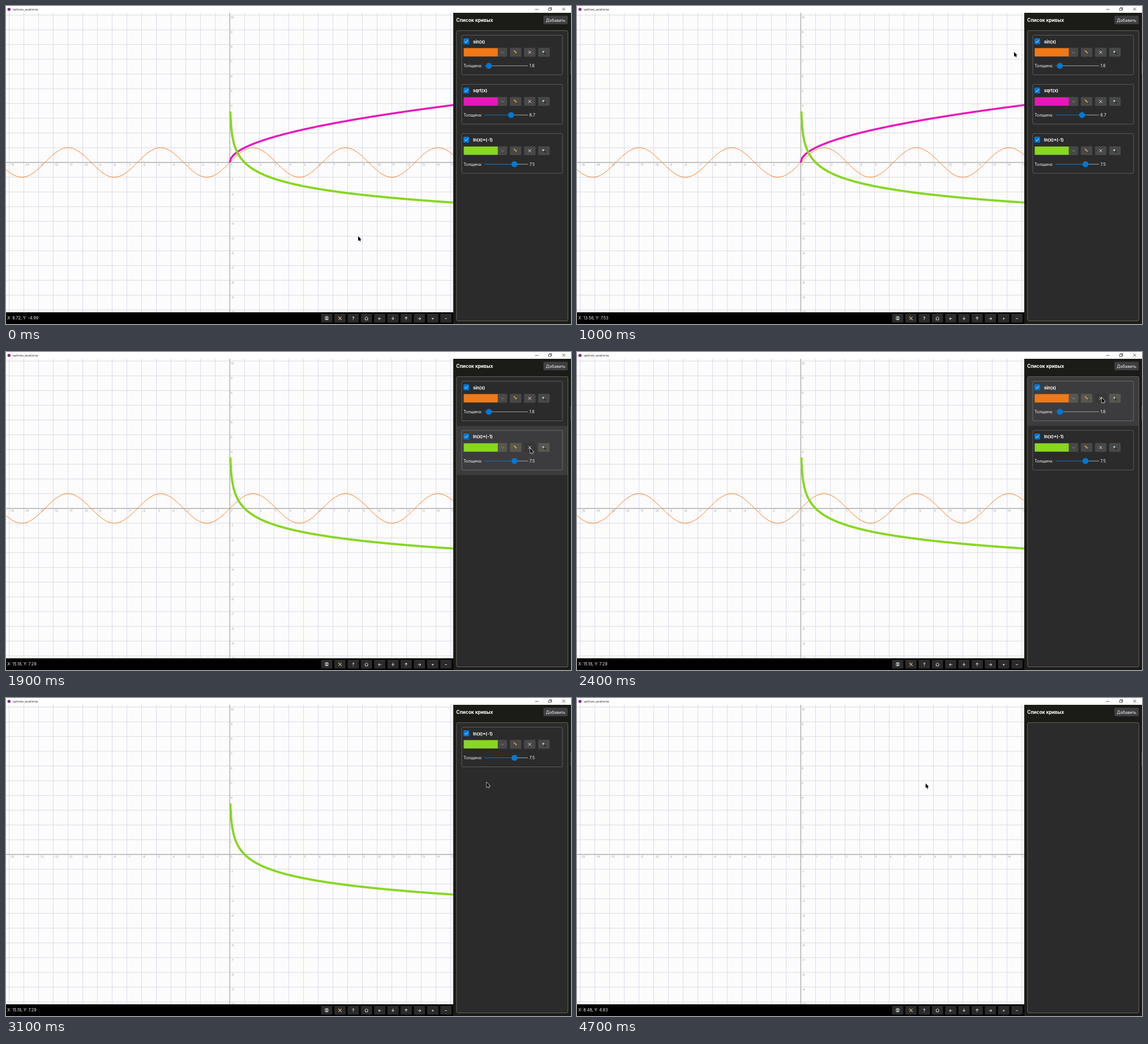
An HTML page with a canvas that plays this animation: 998x561 px, repeating every 4800 ms.

```html
<!DOCTYPE html>
<html lang="ru">
<head>
<meta charset="utf-8">
<title>splines_avalonia</title>
<style>
html, body { margin: 0; width: 100%; height: 100%; overflow: hidden; background: #000; }
canvas { display: block; width: 998px; height: 561px; }
</style>
</head>
<body>
<canvas id="stage" width="998" height="561"></canvas>
<script>
const g = document.getElementById('stage').getContext('2d');
const LOOP = 4800, STEP = 100;
const OX = 395.5, OY = 276, UNIT = 26, PLOT_RIGHT = 790, ROW = 86.8;

const curves = [
  { name: 'sin(x)', color: '#f27816', width: 1.6, from: -15.3, removed: 2600, fn: Math.sin },
  { name: 'sqrt(x)', color: '#ea16bb', width: 6.7, from: 0, removed: 1800, fn: Math.sqrt },
  { name: 'ln(x)*(-1)', color: '#88d722', width: 7.5, from: 0.0314, removed: 3800, fn: x => -Math.log(x) }
];

// time, x, y of the pointer
const path = [
  [0, 622, 406], [200, 622, 406], [900, 748.4, 80.4], [1000, 772, 81],
  [1400, 926, 165], [1600, 926, 170], [1900, 926, 170], [2200, 927, 81],
  [2600, 927, 81], [2900, 849, 149], [3300, 849, 149], [3600, 928, 81],
  [3900, 928, 81], [4500, 615.8, 150.6], [LOOP, 615.8, 150.6]
];

function pointerAt(t) {
  const i = Math.max(1, path.findIndex(p => p[0] >= t));
  const [t0, x0, y0] = path[i - 1], [t1, x1, y1] = path[i];
  const k = (t - t0) / (t1 - t0);
  return { x: x0 + (x1 - x0) * k, y: y0 + (y1 - y0) * k };
}

function rect(x, y, w, h, fill) {
  g.fillStyle = fill;
  g.fillRect(x, y, w, h);
}

function box(x, y, w, h, r, fill, stroke) {
  g.beginPath();
  g.roundRect(x, y, w, h, r);
  if (fill) { g.fillStyle = fill; g.fill(); }
  if (stroke) { g.strokeStyle = stroke; g.lineWidth = 0.8; g.stroke(); }
}

function text(s, x, y, size, color, weight = 400, align = 'left', family = 'Inter') {
  g.font = `${weight} ${size}px ${family}, sans-serif`;
  g.textAlign = align;
  g.fillStyle = color;
  g.fillText(s, x, y);
}

function line(points, color, width = 0.8) {
  g.beginPath();
  points.forEach(([x, y]) => g.lineTo(x, y));
  g.strokeStyle = color;
  g.lineWidth = width;
  g.stroke();
}

function disc(x, y, r, color) {
  g.beginPath();
  g.arc(x, y, r, 0, 2 * Math.PI);
  g.fillStyle = color;
  g.fill();
}

function cross(x, y, r, color, width) {
  line([[x - r, y - r], [x + r, y + r]], color, width);
  line([[x + r, y - r], [x - r, y + r]], color, width);
}

function titleBar() {
  rect(0, 0, 998, 12, '#fff');
  disc(5.3, 6, 2.7, '#7b3089');
  text('splines_avalonia', 12, 8.2, 5.85, '#222', 400, 'left', '"Open Sans"');
  line([[934.5, 6], [940.5, 6]], '#333');
  box(958.5, 4, 4, 4, 0, null, '#333');
  line([[960, 4], [960, 2.8], [963.8, 2.8], [963.8, 6.6], [962.5, 6.6]], '#333');
  cross(985, 5.5, 2.6, '#333', 0.8);
}

function plot(shown) {
  g.save();
  g.beginPath();
  g.rect(0, 12, PLOT_RIGHT, 528.5);
  g.clip();
  rect(0, 12, PLOT_RIGHT, 529, '#fcfcfd');
  for (let i = -15; i <= 15; i++) rect(395 + i * UNIT, 12, 1, 529, '#dedbea');
  for (let i = -10; i <= 10; i++) rect(0, OY - 0.5 - i * UNIT, PLOT_RIGHT, 1, '#dcdce0');
  rect(394.7, 12, 1.2, 529, '#a4a4a4');
  rect(0, 275.4, PLOT_RIGHT, 1.2, '#a4a4a4');
  for (let i = -15; i <= 15; i++) text(i, 396.6 + i * UNIT, 282.2, 5.3, '#a3a3a3');
  for (let i = -10; i <= 10; i++) if (i) text(i, 396.8, 282.3 - i * UNIT, 5.3, '#a3a3a3');
  for (const c of shown) {
    const points = [];
    for (let x = c.from; x < 15.4; x += x < 1 && c.from >= 0 ? 0.005 : 0.05)
      points.push([OX + x * UNIT, OY - c.fn(x) * UNIT]);
    g.lineJoin = 'round';
    line(points, c.color, Math.max(1, c.width * 0.52));
  }
  g.restore();
}

function toolbar(t) {
  rect(0, 540.5, PLOT_RIGHT, 20.5, '#000');
  const p = pointerAt(Math.max(0, t - STEP));
  const status = p.x > PLOT_RIGHT ? 'X: 15.18, Y: 7.29'
    : `X: ${((p.x - 395.3) / UNIT).toFixed(2)}, Y: ${((276.2 - p.y) / UNIT).toFixed(2)}`;
  text(status, 2.3, 553.3, 7.2, '#f2f2f2');

  [...'  ? ←↓↑→+−'].forEach((sign, i) => {
    const x = 566.5 + i * 23.4;
    box(x - 10, 543, 20, 15.5, 1.5, '#2b2b2b');
    text(sign, x, 553.6, 7.5, '#f2f2f2', 600, 'center');
  });
  box(563.8, 548.2, 5.4, 5.4, 0.5, null, '#ddd');
  box(565, 548.2, 3, 1.7, 0, null, '#ddd');
  rect(565, 551.4, 3, 2, '#ddd');
  line([[587.2, 548.2], [592.7, 553.8]], '#d5d5d5', 1.1);
  line([[592.6, 548.2], [587.2, 553.8]], '#d99b4c', 1.1);
  line([[633.8, 551], [636.7, 548], [639.6, 551]], '#eee', 0.9);
  line([[634.5, 550.5], [634.5, 553.8], [638.9, 553.8], [638.9, 550.5]], '#eee', 0.9);
}

function card(c, y, hover, pressed, onRemove) {
  if (hover) rect(796.3, y - 7.8, 196, ROW - 0.3, pressed ? '#555555' : '#3c3c3e');
  box(805, y, 178, 70, 2, null, hover ? '#77776e' : '#686868');
  box(808, y + 5.5, 10, 10.5, 1.5, '#0078d4');
  line([[810.4, y + 10.9], [812.3, y + 12.8], [815.8, y + 8.9]], '#fff', 0.9);
  text(c.name, 825, y + 14, 7.6, '#fff', 700);

  const button = hover ? pressed ? '#6b6b6b' : '#57574f' : '#484848';
  box(808, y + 22.3, 77.3, 15.7, 1.5, button);
  rect(808.6, y + 22.9, 60, 14.5, c.color);
  line([[874.3, y + 29], [877, y + 31.7], [879.7, y + 29]], '#9a9a9a', 0.8);
  box(890, y + 22.3, 20.3, 15.7, 1.5, button);
  box(915, y + 22.3, 20.3, 15.7, 1.5, onRemove ? pressed ? '#8f8f8f' : '#373737' : button);
  box(940, y + 22.3, 20.3, 15.7, 1.5, button);

  line([[897.4, y + 27.2], [902.3, y + 32.1]], '#e0a030', 1.8);
  line([[902.1, y + 31.9], [903.6, y + 33.4]], '#3a2618', 1.3);
  line([[896.8, y + 26.6], [897.6, y + 27.4]], '#c96a62', 1.8);
  cross(925.1, y + 30.2, 2.5, '#eee', 0.9);
  line([[950.5, y + 30.7], [953.4, y + 33.6]], '#24201c', 1.5);
  disc(949, y + 29.2, 2.4, '#38444c');
  disc(949, y + 29.2, 1.7, '#a9cbe0');

  const knob = 840.8 + 7.65 * c.width, mid = y + 54;
  text('Толщина:', 808, y + 56.7, 7.2, '#f4f4f4');
  line([[845, mid], [knob, mid]], pressed ? '#4c5a69' : '#1471bd', 1.1);
  line([[knob, mid], [922, mid]], '#9c9c9c', 1.1);
  disc(knob, mid, 5.3, '#0078d4');
  text(c.width.toFixed(1), 924.5, y + 56.7, 7.2, '#f4f4f4');
}

function panel(shown, p, t) {
  rect(PLOT_RIGHT, 12, 208, 549, '#1b1b17');
  text('Список кривых', 795.3, 28, 8.35, '#fff', 700);
  box(949.3, 17.2, 43, 15, 1.5, '#3f3f42');
  text('Добавить', 970.8, 27.6, 7.25, '#f4f4f4', 400, 'center');
  rect(997, 96, 1, 24, '#4a4a45');
  box(795.8, 43.4, 196.8, 512.2, 2.5, '#2b2b2b');
  shown.forEach((c, i) => {
    const y = 51.5 + i * ROW;
    const hover = p.x > 796 && p.x < 992 && p.y > y - 8 && p.y < y + ROW - 8;
    const onRemove = hover && p.x > 915 && p.x < 935 && p.y > y + 22 && p.y < y + 38;
    card(c, y, hover, onRemove && c.removed - t <= STEP, onRemove);
  });
  box(795.8, 43.4, 196.8, 512.2, 2.5, null, '#787870');
}

function pointer({ x, y }) {
  g.beginPath();
  [[0, 0], [0, 8.4], [1.9, 6.7], [3.2, 9.6], [4.6, 9], [3.3, 6.2], [5.8, 6.1]]
    .forEach(([dx, dy]) => g.lineTo(x + dx, y + dy));
  g.closePath();
  g.lineJoin = 'miter';
  g.strokeStyle = '#fff';
  g.lineWidth = 1.1;
  g.stroke();
  g.fillStyle = '#000';
  g.fill();
}

function draw() {
  const t = Math.floor(performance.now() % LOOP / STEP) * STEP;
  const shown = curves.filter(c => t < c.removed);
  const p = pointerAt(t);
  titleBar();
  plot(shown);
  toolbar(t);
  panel(shown, p, t);
  pointer(p);
  requestAnimationFrame(draw);
}
draw();
</script>
</body>
</html>
```
